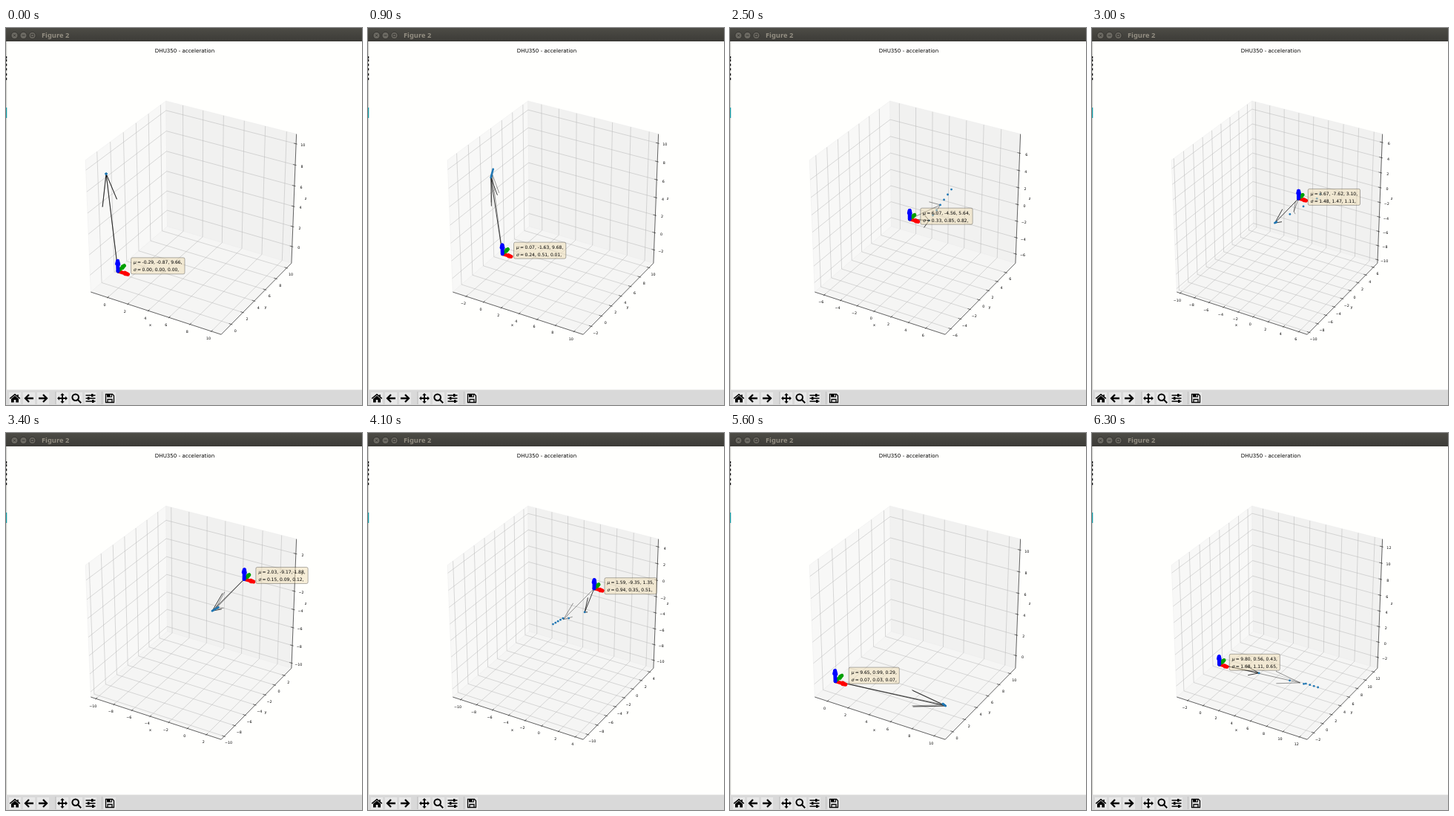
An HTML page with a canvas for the animation above (8 s loop, 480 by 507 pixels).

```html
<!DOCTYPE html>
<html lang="en">
<head>
<meta charset="utf-8">
<title>Acceleration plot</title>
<style>
html, body { margin: 0; width: 100%; height: 100%; overflow: hidden; background: #fffffd; }
canvas { display: block; width: 480px; height: 507px; }
</style>
</head>
<body>
<canvas id="stage"></canvas>
<script>
const W = 480, H = 507, LOOP = 8000, STEP = 100, LAST = 63, TRAIL = 7;
const canvas = document.getElementById('stage');
const ctx = canvas.getContext('2d');
const ratio = window.devicePixelRatio || 1;
canvas.width = W * ratio;
canvas.height = H * ratio;
const SANS = '"DejaVu Sans", sans-serif';

// Turning points of the sensor: step, then acceleration x, y, z
const PATH = [
  [3, -.29, -.87, 9.66], [9, .43, -2.4, 9.7], [14, 1.98, -1.93, 9.44], [15, 2.5, -2.2, 9],
  [19, 6.57, -3.29, 6.87], [25, 5.57, -5.83, 4.41], [28, 2.26, -9.04, 2.06],
  [34, 1.8, -9.3, 1.7], [39, .6, -9.7, .7], [41, 3.6, -8.6, 2.4], [42, 5.5, -6.3, 4.8],
  [47, 9.4, -2.5, 1.7], [50, 9.55, .94, .39], [56, 9.75, 1.04, .19], [60, 11.6, 1.25, .05],
  [62, 8.58, .47, .38], [63, 6.3, -2.1, 2]
];

function sampleAt(k) {
  let i = 0;
  while (i < PATH.length - 2 && k >= PATH[i + 1][0]) i++;
  const [from, ...a] = PATH[i], [to, ...b] = PATH[i + 1];
  const f = Math.min(1, Math.max(0, (k - from) / (to - from)));
  return a.map((v, j) => v + (b[j] - v) * f);
}

const average = list => list.reduce((sum, v) => sum + v, 0) / list.length;

// Everything shown follows from the last few samples
function measure(k) {
  const trail = Array.from({ length: TRAIL }, (_, i) => sampleAt(k - i));
  const axes = [0, 1, 2].map(j => trail.map(p => p[j]));
  const mean = axes.map(average);
  const dev = axes.map((a, j) => Math.sqrt(average(a.map(v => (v - mean[j]) ** 2))));
  const all = [0, ...trail.flat()];
  const lowPad = Math.min(1, .57 + Math.max(0, k - 3) / 20); // opens as the motion begins
  const min = Math.min(...all) - lowPad, max = Math.max(...all) + 1;
  return { trail, mean, dev, min, max };
}

// Perspective view of the unit cube: elevation 30, azimuth -60, distance 10
function project([u, v, w]) {
  u -= .5; v -= .5; w -= .5;
  const depth = 10 - (.433 * u - .75 * v + .5 * w);
  return [
    251.7 + 2030 * (.866 * u + .5 * v) / depth,
    249.8 - 2025 * (-.25 * u + .433 * v + .866 * w) / depth
  ];
}

function trace(points) {
  ctx.beginPath();
  for (const p of points) ctx.lineTo(...p);
}

function line(points, color, width) {
  trace(points);
  ctx.strokeStyle = color;
  ctx.lineWidth = width;
  ctx.stroke();
}

const line3 = (points, color, width) => line(points.map(project), color, width);

function text(str, x, y, font, color = '#000', align = 'center') {
  ctx.font = font;
  ctx.fillStyle = color;
  ctx.textAlign = align;
  ctx.fillText(str, x, y);
}

function drawCube(min, max, unit) {
  const panes = [
    [[[0, 0, 0], [0, 1, 0], [0, 1, 1], [0, 0, 1]], '#f8f8f7'],
    [[[0, 1, 0], [1, 1, 0], [1, 1, 1], [0, 1, 1]], '#f1f1f0'],
    [[[0, 0, 0], [1, 0, 0], [1, 1, 0], [0, 1, 0]], '#f5f5f4']
  ];
  for (const [corners, fill] of panes) {
    trace(corners.map(project));
    ctx.closePath();
    ctx.fillStyle = fill;
    ctx.fill();
    ctx.strokeStyle = '#ebebea';
    ctx.lineWidth = .5;
    ctx.stroke();
  }

  const step = [1, 2, 2.5, 5].find(s => (max - min) / s <= 9);
  const ticks = [];
  for (let v = Math.ceil(min / step) * step; v <= max; v += step) ticks.push(v);

  for (const v of ticks) {
    const a = unit(v);
    line3([[a, 0, 0], [a, 1, 0], [a, 1, 1]], '#b4b4b4', .5);
    line3([[1, a, 0], [0, a, 0], [0, a, 1]], '#b4b4b4', .5);
    line3([[0, 0, a], [0, 1, a], [1, 1, a]], '#b4b4b4', .5);
  }

  line3([[0, 0, 0], [1, 0, 0], [1, 1, 0], [1, 1, 1]], '#000', .6);

  const near = .983, out = 1.009;
  for (const v of ticks) {
    const a = unit(v);
    const label = v.toFixed(step === 2.5 ? 1 : 0).replace('-', '\u2212');
    const marks = [
      [[a, 1 - near, 0], [a, 1 - out, 0], -3, 10.5],
      [[near, a, 0], [out, a, 0], 4, 10],
      [[near, 1, a], [out, 1, a], 7.5, 3]
    ];
    for (const [from, to, dx, dy] of marks) {
      line3([from, to], '#000', .5);
      const [x, y] = project(to);
      text(label, x + dx, y + dy, '4.8px ' + SANS);
    }
  }
  text('x', 194.5, 401, '5px ' + SANS);
  text('y', 350, 377, '5px ' + SANS);
  text('z', 404, 231, '5px ' + SANS);
}

// Arrow from the data origin; the two barbs are turned 15 degrees from the shaft
function arrow(vec, toScreen, color, width) {
  const [x, y, z] = vec;
  const flat = Math.hypot(x, y);
  const [ax, ay] = flat ? [y / flat, -x / flat] : [0, 1];
  const side = [ay * z, -ax * z, ax * y - ay * x];
  const c = .3 * Math.cos(Math.PI / 12), s = .3 * Math.sin(Math.PI / 12);
  const barb = sign => toScreen(vec.map((v, i) => v * (1 - c) + sign * s * side[i]));
  const tip = toScreen(vec);
  line([toScreen([0, 0, 0]), tip], color, width);
  line([barb(1), tip, barb(-1)], color, width);
}

function drawNote([ox, oy], range, mean, dev) {
  const x = ox + 3.9 + 217 / range;
  const top = oy + .3 - 232 / range;
  const list = a => a.map(v => v.toFixed(2) + ',').join(' ');
  const rows = [['μ', list(mean)], ['σ', list(dev)]];
  const font = '6px ' + SANS;
  ctx.font = font;
  const width = Math.max(...rows.map(r => ctx.measureText(r[1]).width)) + 11.5;
  ctx.beginPath();
  ctx.roundRect(x - 3.5, top, width + 7, 22, 2);
  ctx.fillStyle = 'rgba(240,222,179,.5)';
  ctx.fill();
  ctx.strokeStyle = 'rgba(0,0,0,.5)';
  ctx.lineWidth = .6;
  ctx.stroke();
  rows.forEach(([name, values], i) => {
    const y = top + 8.4 + 10 * i;
    text(name, x, y, 'italic ' + font, '#000', 'left');
    text('=', x + 5, y, font, '#000', 'left');
    text(values, x + 11.5, y, font, '#000', 'left');
  });
}

function drawPlot(k) {
  const { trail, mean, dev, min, max } = measure(k);
  const pad = (max - min) / 48; // the panes reach a little past the limits
  const range = max - min + 2 * pad;
  const unit = v => (v - min + pad) / range;
  const toScreen = p => project(p.map(unit));

  drawCube(min, max, unit);
  ctx.lineCap = ctx.lineJoin = 'round';
  arrow(mean, toScreen, 'rgba(0,0,0,.5)', .8);
  arrow(trail[0], toScreen, 'rgba(0,0,0,.75)', 1);
  ctx.fillStyle = '#1f77b4';
  for (const p of trail) {
    ctx.beginPath();
    ctx.arc(...toScreen(p), 1.4, 0, 7);
    ctx.fill();
  }
  arrow([1, 0, 0], toScreen, '#f00', 4.6);
  arrow([0, 1, 0], toScreen, '#00a000', 4.6);
  arrow([0, 0, 1], toScreen, '#00f', 5);
  ctx.lineCap = 'butt';
  ctx.lineJoin = 'miter';
  drawNote(toScreen([0, 0, 0]), range, mean, dev);
}

function rect(x, y, w, h, color) {
  ctx.fillStyle = color;
  ctx.fillRect(x, y, w, h);
}

function icon(x, fill, stroke, width = 1.5) {
  rect(x - 8, 490, 16, 16, '#e8e8e8');
  ctx.save();
  ctx.translate(x, 498);
  ctx.fillStyle = ctx.strokeStyle = '#000';
  ctx.lineWidth = width;
  ctx.fill(new Path2D(fill), 'evenodd');
  ctx.stroke(new Path2D(stroke));
  ctx.restore();
}

function drawWindow() {
  const bar = ctx.createLinearGradient(0, 0, 0, 18);
  bar.addColorStop(0, '#4d4c46');
  bar.addColorStop(1, '#3c3b37');
  rect(0, 0, W, 18, bar);
  const glyphs = ['M-1.5-1.5L1.5 1.5M1.5-1.5L-1.5 1.5', 'M-2 0H2', 'M-1.7-1.7H1.7V1.7H-1.7Z'];
  glyphs.forEach((glyph, i) => {
    ctx.save();
    ctx.translate(11.5 + 12 * i, 10);
    ctx.beginPath();
    ctx.arc(0, 0, 4.6, 0, 7);
    ctx.fillStyle = '#6c6a63';
    ctx.fill();
    ctx.strokeStyle = '#33322e';
    ctx.lineWidth = .9;
    ctx.stroke();
    ctx.stroke(new Path2D(glyph));
    ctx.restore();
  });
  text('Figure 2', 48, 13.3, 'bold 9.3px "Noto Sans", sans-serif', '#948f83', 'left');

  // Sliver of the window behind
  rect(0, 18, 1.2, 489, '#d0d0ce');
  for (const y of [38, 42, 48, 54, 61, 67]) rect(0, y, 1.2, 3, '#111');
  rect(0, 107, 1.2, 14, '#0f9aa5');

  rect(0, 486.5, W, 20.5, '#d9d9d9');
  for (const x of [66.5, 129]) rect(x, 489, .8, 17, '#b8b8b8');
  icon(12, 'M-5 .8L0-3.5L5 .8V5.5H1.3V2H-1.3V5.5H-5Z', 'M-6.8 .4L0-5.3L6.8 .4M4-5V-2');
  icon(31, '', 'M6 0H-5M0-5L-5 0L0 5', 2.3);
  icon(50, '', 'M-6 0H5M0-5L5 0L0 5', 2.3);
  icon(76, 'M0-7L2.7-4H-2.7ZM0 7L2.7 4H-2.7ZM-7 0L-4-2.7V2.7ZM7 0L4-2.7V2.7Z',
    'M0-5V5M-5 0H5', 1.8);
  icon(95, '', 'M3-1.3A4.3 4.3 0 1 1-5.6-1.3A4.3 4.3 0 1 1 3-1.3M1.8 1.8L6.2 6.2', 2);
  icon(114, 'M1-6H3.5V-2H1ZM-4-2H-1.5V2H-4ZM2 2H4.5V6H2Z', 'M-6.5-4H6.5M-6.5 0H6.5M-6.5 4H6.5', 1.3);
  icon(140, 'M-4-6H3V-1.5H-4ZM.5-5V-2.5H2V-5Z', 'M-5.5-5.5H3.5L5.5-3.5V5.5H-5.5ZM-3 5V1.5H3V5', 1.3);
}

// Steps on which the picture rests
const HOLD = [3, 29, 36, 61];

function draw(now) {
  let k = Math.min(LAST, Math.floor(now % LOOP / STEP));
  if (HOLD.includes(k)) k--;
  ctx.setTransform(ratio, 0, 0, ratio, 0, 0);
  rect(0, 0, W, H, '#fffffd');
  drawWindow();
  text('DHU350 - acceleration', 241, 33, '7.1px ' + SANS);
  drawPlot(k);
}

const start = performance.now();
function tick() {
  draw(performance.now() - start);
  requestAnimationFrame(tick);
}
tick();
</script>
</body>
</html>
```
